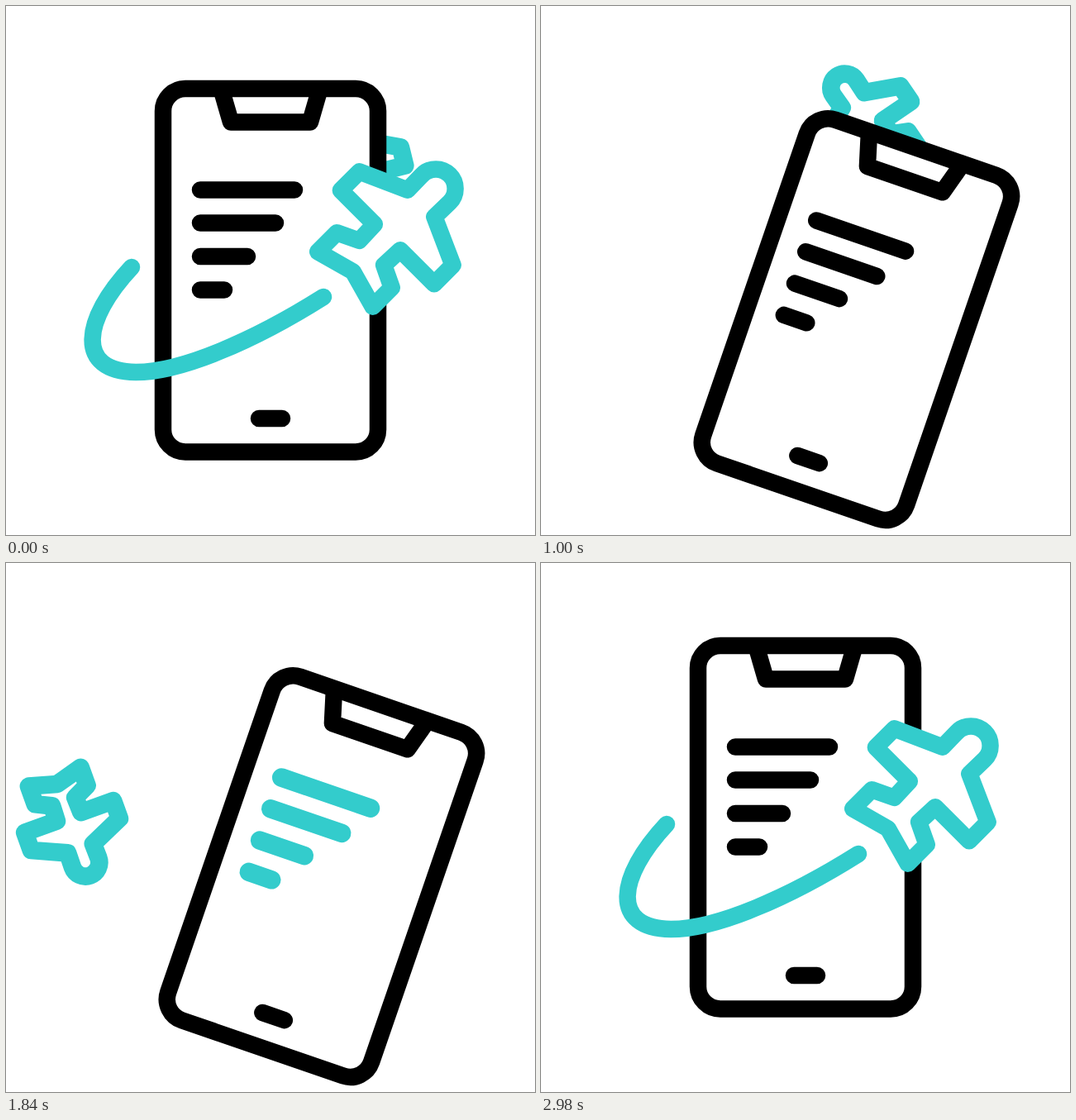
Animation, 640 px wide and 640 px high, one loop 3.6 s. Source, as an HTML page:

```html
<!DOCTYPE html>
<html lang="en">
<head>
<meta charset="utf-8">
<title>Phone and plane</title>
<style>
  html, body { margin: 0; width: 100%; height: 100%; overflow: hidden; background: #fff; }
  svg { display: block; width: 100vw; height: 100vh; }
  .ink { stroke: #000; stroke-width: 20.5; }
  .teal { stroke: #3cc; }
  .scan { stroke-width: 22.5; }
  .trail { stroke-width: 20.5; }
</style>
</head>
<body>
<svg viewBox="0 0 640 640" fill="none" stroke-linecap="round" stroke-linejoin="round">
  <defs>
    <path id="plane" d="M2-80H34L59.5-23 85-23.5A23.5 23.5 0 0 1 85 23.5L59.5 23 34 80H2V22L-25 21-37.5 47H-70L-57 0-70-47H-37.5L-25-21 2-22Z"/>
  </defs>
  <use id="back" href="#plane" class="teal" fill="#fff"/>
  <g id="phone">
    <g class="ink">
      <rect x="190" y="100" width="260" height="439.5" rx="27" fill="#fff"/>
      <path d="M262 106L272 140.5H368L378 106M306 499H334"/>
      <path d="M235 222.5H349M235 262.5H326M235 303H292M235 343.5H264"/>
    </g>
    <g class="teal scan">
      <path pathLength="1" d="M235 222.5H349"/>
      <path pathLength="1" d="M235 262.5H326"/>
      <path pathLength="1" d="M235 303H292"/>
      <path pathLength="1" d="M235 343.5H264"/>
    </g>
  </g>
  <path id="trail" class="teal trail" pathLength="1" d="M152 316C92 380 84 442 157 443C212 443 300 405 384 352"/>
  <use id="front" href="#plane" class="teal" fill="#fff"/>
</svg>
<script>
  const LOOP = 3600;
  const $ = id => document.getElementById(id);
  const back = $('back'), front = $('front'), phone = $('phone'), trail = $('trail');
  const bars = document.querySelectorAll('.scan path');

  const clamp = v => Math.min(1, Math.max(0, v));
  const span = (t, a, b) => clamp((t - a) / (b - a));
  const ease = p => (1 - Math.cos(Math.PI * p)) / 2;
  const lerp = (a, b, p) => a + (b - a) * p;

  // Eased value through [time, value] pairs
  function keys(t, list) {
    let [t0, v0] = list[0];
    for (const [t1, v1] of list) {
      if (t < t1) return lerp(v0, v1, ease(span(t, t0, t1)));
      t0 = t1; v0 = v1;
    }
    return v0;
  }

  function trim(el, from, to) {
    const len = to - from;
    el.style.display = len > 0.001 ? '' : 'none';
    el.setAttribute('stroke-dasharray', `${len} 3`);
    el.setAttribute('stroke-dashoffset', -from);
  }

  function place(el, pose) {
    el.style.display = pose ? '' : 'none';
    if (!pose) return;
    const { x, y, angle, size = 1 } = pose;
    el.setAttribute('transform', `translate(${x} ${y}) rotate(${angle}) scale(${size})`);
    el.setAttribute('stroke-width', (20.5 + (1 - size) * 4) / size);
  }

  // Point and heading on a cubic curve
  function curve(p, [x0, y0, x1, y1, x2, y2, x3, y3]) {
    const q = 1 - p;
    const at = (a, b, c, d) => q * q * q * a + 3 * q * q * p * b + 3 * q * p * p * c + p * p * p * d;
    const slope = (a, b, c, d) => q * q * (b - a) + 2 * q * p * (c - b) + p * p * (d - c);
    const angle = Math.atan2(slope(y0, y1, y2, y3), slope(x0, x1, x2, x3)) * 180 / Math.PI;
    return { x: at(x0, x1, x2, x3), y: at(y0, y1, y2, y3), angle };
  }

  const RISE = [428, 208, 410, 135, 345, 75, 285.3, 87.4];
  const DIVE = [285.3, 87.4, 168, 111, 50, 232, 75.5, 305];
  const SWEEP = [75.5, 305, 113, 411, 310, 419, 432.6, 320.4];

  function takeOff(t) {
    const s = Math.max(0, (t - 205) / 495);
    return {
      x: 460 + 226.6 * s - 20.1 * s * s,
      y: 281 - 207.1 * s - 31.9 * s * s,
      angle: -45 - 8.8 * s - 5.5 * s * s
    };
  }

  function orbit(t) {
    const size = lerp(0.71, 1, span(t, 1840, 2400));
    if (t < 1320) return { ...curve(span(t, 700, 1320) ** 1.7, RISE), size };
    if (t < 1840) return { ...curve(span(t, 1320, 1840), DIVE), size };
    if (t < 2420) return { ...curve(span(t, 1840, 2420), SWEEP), size };
    // Fly a little too far, then drift back
    const out = Math.sin(span(t, 2420, 2660) * Math.PI / 2);
    const home = ease(span(t, 2660, 2900));
    return {
      x: lerp(lerp(432.6, 529, out), 460, home),
      y: lerp(lerp(320.4, 219, out), 281, home),
      angle: lerp(lerp(-39, -42, out), -45, home)
    };
  }

  function draw(t) {
    const tx = keys(t, [[400, 0], [640, 4], [780, 0]]);
    const ty = keys(t, [[200, 0], [400, -38], [780, 49], [2217, 49], [2583, 0]]);
    const tilt = keys(t, [[380, 0], [730, 19], [2030, 19], [2454, 0]]);
    phone.setAttribute('transform', `translate(${tx} ${ty}) rotate(${tilt} 320 510)`);

    bars.forEach((bar, i) => {
      const on = 1050 + i * 180, off = 2218 + i * 160;
      trim(bar, ease(span(t, off, off + 160)), ease(span(t, on, on + 180)));
    });

    if (t < 1500) trim(trail, 1 - (1 - span(t, 200, 967)) ** 2.5, 1);
    else trim(trail, 0, ease(span(t, 2000, 2400)));

    place(back, t < 1500 ? orbit(t) : null);
    place(front, t < 1100 ? takeOff(t) : t < 1500 ? null : orbit(t));
  }

  const start = performance.now();
  function tick() {
    draw((performance.now() - start) % LOOP);
    requestAnimationFrame(tick);
  }
  tick();
</script>
</body>
</html>
```
